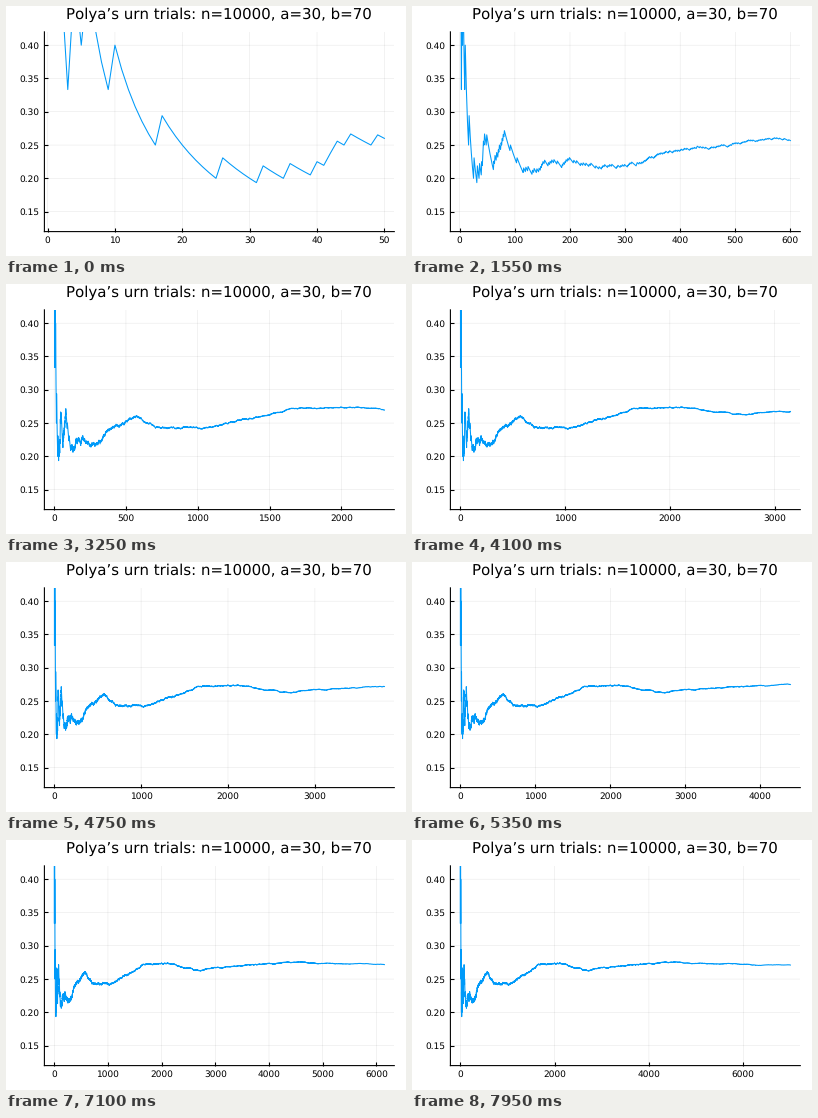
Recreate the animation shown at these times as a matplotlib script. Size 400x250 px, loop 8000 ms.

```python
from itertools import pairwise
import math

import matplotlib.pyplot as plt
import numpy as np
from matplotlib.animation import FuncAnimation

WIDTH, HEIGHT, DPI = 400, 250, 100
PX = 72 / DPI
LEFT, RIGHT, TOP, BOTTOM = 38.4, 388.3, 25.85, 225.6
INTERVAL, FRAMES = 50, 160
HOLD, STEP = 20, 50

OPENING_HITS = [1, 4, 6, 10, 17, 26, 32, 36, 40, 42, 43, 45, 49]

# Main turns of the running share after the opening: (trials, share).
TURNS = [(60, 0.217), (81, 0.272), (108, 0.222), (200, 0.230), (250, 0.214),
         (300, 0.219), (410, 0.245), (583, 0.259), (817, 0.243),
         (1144, 0.246), (1659, 0.272), (2145, 0.273), (2612, 0.263),
         (4200, 0.274), (7000, 0.271)]


def running_share():
    """Share of hits after each trial; hits fall half evenly, half at random."""
    rng = np.random.default_rng(4)
    hits = list(OPENING_HITS)
    totals = [(50, len(hits))] + [(n, round(n * share)) for n, share in TURNS]
    for (start, before), (end, after) in pairwise(totals):
        gain = after - before
        even = (np.arange(gain) + 0.5) / max(gain, 1)
        place = (even + np.sort(rng.random(gain))) / 2
        hits.extend(start + place * (end - start))
    trials = np.arange(1, totals[-1][0] + 1)
    return trials, np.searchsorted(np.sort(hits), trials, side="right") / trials


def nice_ticks(low, high):
    """Four to eight round ticks, scored by number, coverage and roundness."""
    best, best_score = [], -math.inf
    for power in range(5):
        for base, niceness in [(1, 1), (5, 0.9), (2, 0.7), (2.5, 0.5)]:
            step = base * 10**power
            ticks = np.arange(math.ceil(low / step), math.floor(high / step) + 1) * step
            if not 4 <= len(ticks) <= 8:
                continue
            count = 1 - abs(len(ticks) - 5) / 5
            cover = 1.5 * (high - low) / (ticks[-1] - ticks[0])
            score = count / 4 + cover / 3 + niceness / 4
            if score > best_score + 1e-9:
                best, best_score = ticks, score
    return best


plt.rcParams.update({"font.family": "DejaVu Sans", "text.hinting": "none",
                     "text.hinting_factor": 1, "path.snap": False})
fig = plt.figure(figsize=(WIDTH / DPI, HEIGHT / DPI), dpi=DPI, facecolor="white")
ax = fig.add_axes([LEFT / WIDTH, 1 - BOTTOM / HEIGHT,
                   (RIGHT - LEFT) / WIDTH, (BOTTOM - TOP) / HEIGHT])
ax.set_ylim(0.12, 0.42)
ax.set_yticks(np.arange(0.15, 0.41, 0.05))
ax.yaxis.set_major_formatter("{x:.2f}")
ax.set_axisbelow(True)
ax.grid(color="black", alpha=0.1, linewidth=0.5 * PX)
ax.tick_params(direction="in", length=4 * PX, width=1.1 * PX, labelsize=8.9 * PX)
ax.tick_params(axis="x", pad=4.5 * PX)
ax.tick_params(axis="y", pad=5.2 * PX)
ax.spines[["top", "right"]].set_visible(False)
ax.spines[["left", "bottom"]].set_linewidth(1.1 * PX)
fig.text((LEFT + RIGHT) / 2 / WIDTH, 1 - 13 / HEIGHT,
         "Polya’s urn trials: n=10000, a=30, b=70",
         ha="center", va="baseline", fontsize=14.85 * PX)

trials, share = running_share()
line, = ax.plot([], [], color="#009AF9", linewidth=1.05 * PX)


def draw(frame):
    n = STEP * max(1, frame - HOLD + 1)
    margin = 0.03 * (n - 1)
    low, high = 1 - margin, n + margin
    ticks = nice_ticks(low, high)
    ax.set_xlim(low, high)
    ax.set_xticks(ticks, [f"{t:g}" for t in ticks])
    line.set_data(trials[:n], share[:n])
    return [line]


anim = FuncAnimation(fig, draw, frames=FRAMES, interval=INTERVAL,
                     repeat=True, repeat_delay=0, blit=False)
plt.show()
```
